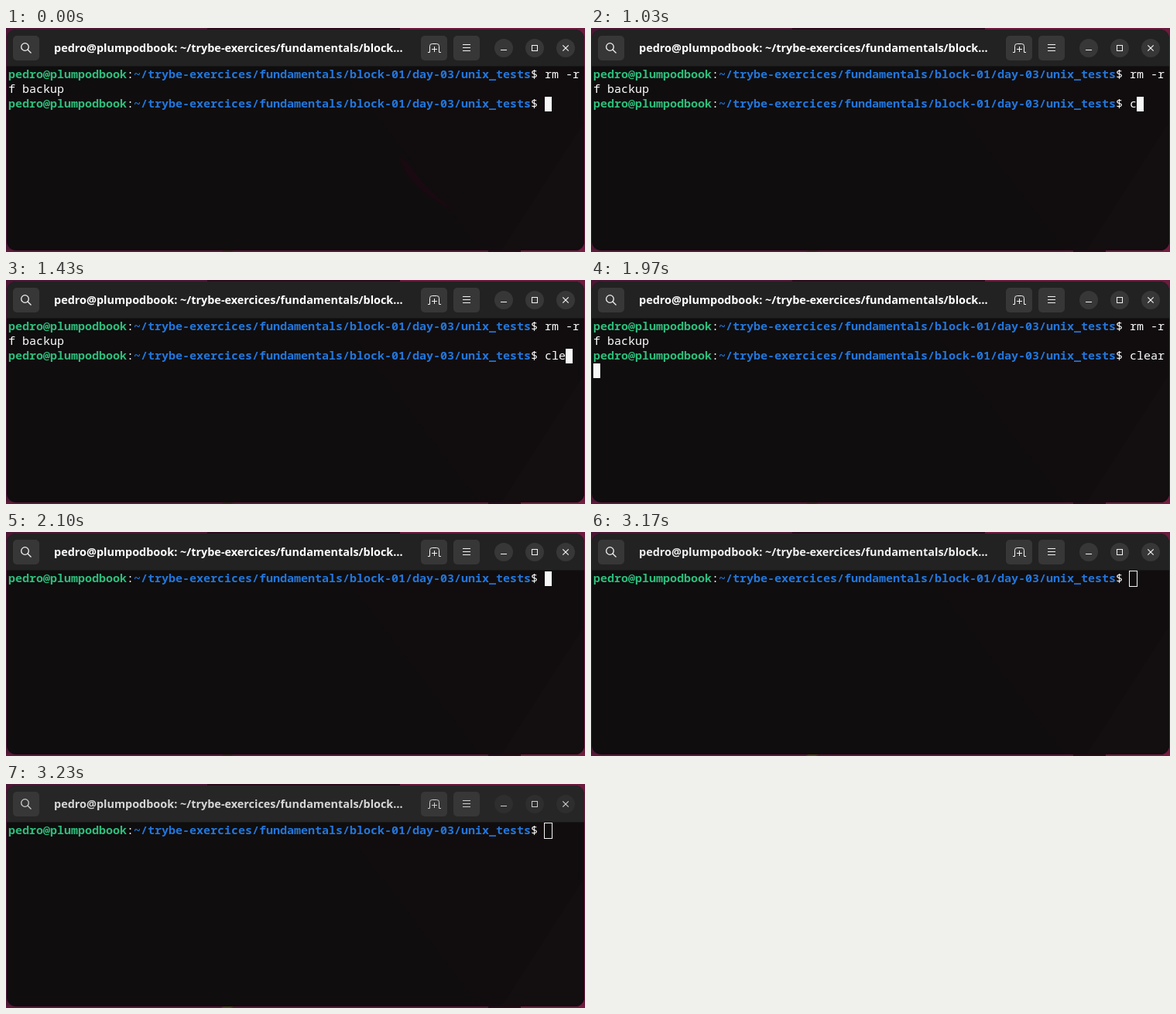
Write an HTML page that moves like this. It is 748 px wide and 290 px high and loops after 3370 ms.

```html
<!DOCTYPE html>
<html lang="en">
<head>
<meta charset="utf-8">
<title>Terminal</title>
<style>
  html, body { margin: 0; width: 100%; height: 100%; overflow: hidden; background: #4b1735; }
  svg { display: block; }
  .mono { font: 15px "Noto Sans Mono", "DejaVu Sans Mono", monospace; fill: #fff; white-space: pre; }
  .user { font-weight: 700; fill: #2ebd7b; }
  .path { font-weight: 700; fill: #2277dd; }
  .title { font: 700 14.43px "Open Sans", "Noto Sans", sans-serif; }
  .icon { fill: none; stroke: #f4f4f4; }
</style>
</head>
<body>
<svg width="748" height="290" viewBox="0 0 748 290">
  <defs>
    <clipPath id="frame"><rect x="1" y="2" width="746" height="286" rx="12"/></clipPath>
  </defs>

  <rect width="748" height="290" fill="#4b1735"/>
  <path d="M260 0H509V3H260Z" fill="#2c0b1c"/>
  <path d="M509 0H748V290H742V3H509Z" fill="#6b1b3e"/>
  <path d="M0 287H748V290H0Z" fill="#5c1a39"/>
  <path d="M623 287H665V290H623Z" fill="#2c0b1c"/>
  <path d="M665 287H748V290H665Z" fill="#741e42"/>
  <path id="leaf" d="M277 290L283 287H296L290 290Z"/>

  <g clip-path="url(#frame)">
    <rect y="2" width="748" height="287" fill="#0f0d0e"/>
    <path d="M430 49H748V288H612Z" fill="#110d0e"/>
    <path d="M748 120L640 288H748Z" fill="#130e0f"/>
    <path id="smear" d="M508 166Q520 172 533 192T582 238Q548 222 530 204T508 166Z" fill="#190910"/>
    <rect id="header" y="2" width="748" height="47" fill="#222"/>
    <path d="M0 49.5H748" stroke="#171717"/>
  </g>

  <g fill="#373737">
    <rect x="9" y="10" width="34" height="32" rx="5"/>
    <rect x="536" y="10" width="34" height="32" rx="5"/>
    <rect x="578" y="10" width="34" height="32" rx="5"/>
  </g>
  <g id="controls">
    <circle cx="643" cy="26" r="12"/>
    <circle cx="683" cy="26" r="12"/>
    <circle cx="723" cy="26" r="12"/>
  </g>
  <g id="icons" class="icon">
    <g stroke-width="1.3">
      <circle cx="24.5" cy="24.5" r="4.8"/>
      <path d="M28 28L32.5 32.5"/>
    </g>
    <path d="M545 31.5H547.5V23.5Q547.5 20.5 550.5 20.5H556.5Q559.5 20.5 559.5 23.5V31.5H562M553.5 24V31M550 27.5H557"/>
    <path d="M590 21.5H600M590 25.5H600M590 29.5H600"/>
    <path d="M639 28.5H647"/>
    <rect x="679.5" y="22.5" width="7" height="7"/>
    <path d="M719.3 22.3L726.7 29.7M726.7 22.3L719.3 29.7" stroke-width="1.2"/>
  </g>
  <text id="title" class="title" x="62" y="31"></text>

  <g id="screen" class="mono"></g>
  <rect id="cursor"/>
</svg>

<script>
const LOOP = 3370, COLUMNS = 82, CELL = 9, LINE = 19, LEFT = 3, TOP = 51;
const USER = "pedro@plumpodbook";
const PATH = "~/trybe-exercices/fundamentals/block-01/day-03/unix_tests";
const PROMPT = USER.length + PATH.length + 3;
const KEYS = [1030, 1170, 1430, 1700, 1970];
const CLEARED = 2100, BLURRED = 3170, DIMMED = 3230;
const CURSOR = "#f7f7f7";

const $ = id => document.getElementById(id);
const set = (id, attrs) => {
  for (const name in attrs) $(id).setAttribute(name, attrs[name]);
};

const textAt = (row, column, content) =>
  `<text x="${LEFT + column * CELL}" y="${TOP + row * LINE + 14}">${content}</text>`;

const promptAt = (row, command) => textAt(row, 0,
  `<tspan class="user">${USER}</tspan>:<tspan class="path">${PATH}</tspan>$ ${command}`);

$("title").textContent = `${USER}: ${PATH.slice(0, PATH.indexOf("-01"))}…`;

let shown;
function draw(time) {
  const cleared = time >= CLEARED, blurred = time >= BLURRED, dimmed = time >= DIMMED;
  const typed = cleared ? "" : "clear".slice(0, KEYS.filter(key => time >= key).length);
  const screen = cleared
    ? promptAt(0, "")
    : promptAt(0, "rm -r") + textAt(1, 0, "f backup") + promptAt(2, typed);
  if (screen !== shown) $("screen").innerHTML = shown = screen;

  // A full line wraps the cursor onto the next row.
  const offset = PROMPT + typed.length;
  const x = LEFT + offset % COLUMNS * CELL;
  const y = TOP + ((cleared ? 0 : 2) + Math.floor(offset / COLUMNS)) * LINE;
  set("cursor", blurred
    ? { x: x - .5, y: y - .5, width: CELL + 1, height: LINE + 1, fill: "none", stroke: CURSOR }
    : { x, y, width: CELL, height: LINE, fill: CURSOR, stroke: "none" });

  set("header", { fill: dimmed ? "#262626" : "#222" });
  set("title", { fill: dimmed ? "#d6d6d6" : blurred ? "#f0f0f0" : "#fff" });
  set("controls", { fill: dimmed ? "#2e2e2e" : "#373737" });
  set("icons", { opacity: dimmed ? .8 : 1 });
  set("leaf", { fill: blurred ? "#55431f" : "#452024" });
  set("smear", { opacity: time < KEYS[0] ? 1 : 0 });
}

const start = performance.now();
function tick() {
  draw((performance.now() - start) % LOOP);
  requestAnimationFrame(tick);
}
tick();
</script>
</body>
</html>
```
